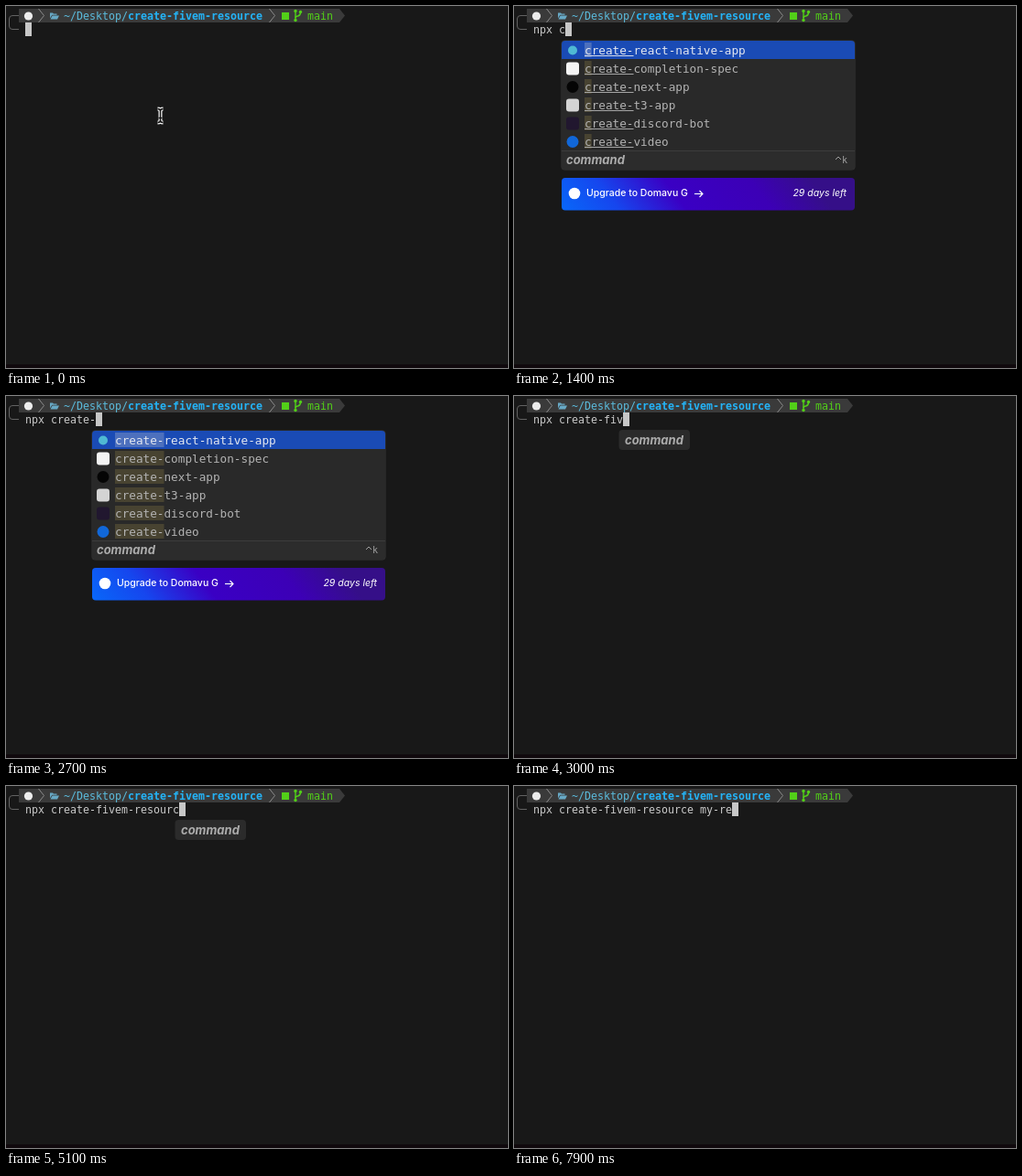
An HTML page with a canvas that plays this animation: 548x396 px, repeating every 8 s.

```html
<!DOCTYPE html>
<html lang="en">
<head>
<meta charset="utf-8">
<title>Terminal typing</title>
<style>
html, body { margin: 0; width: 100%; height: 100%; overflow: hidden; background: #181818; }
canvas { display: block; width: 548px; height: 396px; }
</style>
</head>
<body>
<canvas id="stage" width="548" height="396"></canvas>
<script>
const ctx = document.getElementById('stage').getContext('2d');
const LOOP = 8000;
const CELL = 7;
const LEFT = 21;
const MONO = '"DejaVu Sans Mono", monospace';
const SANS = 'Inter, sans-serif';
const COMMAND = 'npx create-fivem-resource my-re';

// Moment at which each character of COMMAND is typed
const KEYS = [
  600, 800, 1100, 1300,
  1400, 1500, 1600, 1700, 1800, 2000, 2200,
  2800, 2900, 3000, 3200, 3400, 3700,
  3900, 4100, 4300, 4400, 4600, 4900, 5100, 5700,
  6000, 6800, 7000, 7700, 7800, 7900
];

const ITEMS = [
  ['create-react-native-app', '#4fb9d3', 'circle'],
  ['create-completion-spec', '#f4f4f4', 'square'],
  ['create-next-app', '#050505', 'circle'],
  ['create-t3-app', '#d4d4d4', 'square'],
  ['create-discord-bot', '#21172f', 'square'],
  ['create-video', '#1167d8', 'circle']
];

function text(str, x, y, color, font, align = 'left') {
  ctx.font = font;
  ctx.fillStyle = color;
  ctx.textAlign = align;
  ctx.fillText(str, x, y);
}

function rect(x, y, w, h, color) {
  ctx.fillStyle = color;
  ctx.fillRect(x, y, w, h);
}

function box(x, y, w, h, r, color) {
  ctx.beginPath();
  ctx.roundRect(x, y, w, h, r);
  ctx.fillStyle = color;
  ctx.fill();
}

function dot(x, y, r, color) {
  ctx.beginPath();
  ctx.arc(x, y, r, 0, Math.PI * 2);
  ctx.fillStyle = color;
  ctx.fill();
}

function line(points, color, width = 1) {
  ctx.beginPath();
  points.forEach(([x, y], i) => i ? ctx.lineTo(x, y) : ctx.moveTo(x, y));
  ctx.strokeStyle = color;
  ctx.lineWidth = width;
  ctx.stroke();
}

function bracket() {
  ctx.beginPath();
  ctx.moveTo(14, 10.5);
  ctx.lineTo(7, 10.5);
  ctx.quadraticCurveTo(3.5, 10.5, 3.5, 14);
  ctx.lineTo(3.5, 22);
  ctx.quadraticCurveTo(3.5, 25.5, 7, 25.5);
  ctx.lineTo(14, 25.5);
  ctx.strokeStyle = '#626262';
  ctx.lineWidth = 1;
  ctx.stroke();
}

function folder(x, y) {
  ctx.fillStyle = '#67a9c6';
  ctx.beginPath();
  ctx.moveTo(x, y + 6);
  ctx.lineTo(x, y);
  ctx.lineTo(x + 3, y);
  ctx.lineTo(x + 4, y + 1);
  ctx.lineTo(x + 7.5, y + 1);
  ctx.lineTo(x + 7.5, y + 2.3);
  ctx.lineTo(x + 2.3, y + 2.3);
  ctx.fill();
  ctx.beginPath();
  ctx.moveTo(x + 2.6, y + 3);
  ctx.lineTo(x + 10, y + 3);
  ctx.lineTo(x + 8, y + 7);
  ctx.lineTo(x + 0.5, y + 7);
  ctx.fill();
}

function branch(x, y) {
  const green = '#52cf18';
  line([[x, y + 2], [x, y + 11]], green, 1.4);
  ctx.beginPath();
  ctx.moveTo(x + 5.5, y + 3);
  ctx.quadraticCurveTo(x + 5.5, y + 6.5, x + 2.5, y + 7);
  ctx.quadraticCurveTo(x, y + 7.3, x, y + 9);
  ctx.stroke();
  [[0, 1.5], [5.5, 2.5], [0, 11.5]].forEach(([dx, dy]) => dot(x + dx, y + dy, 1.7, green));
}

function header() {
  const font = '11.63px ' + MONO;
  ctx.beginPath();
  [[14, 3], [364, 3], [370, 10.5], [364, 18], [14, 18]].forEach(p => ctx.lineTo(...p));
  ctx.fillStyle = '#3a3a3a';
  ctx.fill();
  bracket();
  dot(24.5, 11, 4.6, '#ececec');
  for (const x of [35.5, 287.5]) line([[x, 3], [x + 6, 10.5], [x, 18]], '#8a8a8a');
  folder(48, 7.5);
  text('~/Desktop/', 63, 15, '#5bbbdc', font);
  text('create-fivem-resource', 133, 15, '#24b4f8', 'bold ' + font);
  rect(301, 7, 8, 8, '#52cf18');
  branch(316, 4);
  text('main', 329, 15, '#52cf18', font);
}

function pointer(x, y) {
  for (const [color, width] of [['#f2f2f2', 4], ['#111111', 1.4]]) {
    ctx.beginPath();
    ctx.moveTo(x - 3, y - 7.5);
    ctx.quadraticCurveTo(x, y - 7.5, x, y - 5);
    ctx.quadraticCurveTo(x, y - 7.5, x + 3, y - 7.5);
    ctx.moveTo(x, y - 5);
    ctx.lineTo(x, y + 5);
    ctx.moveTo(x - 3, y + 7.5);
    ctx.quadraticCurveTo(x, y + 7.5, x, y + 5);
    ctx.quadraticCurveTo(x, y + 7.5, x + 3, y + 7.5);
    ctx.moveTo(x - 2, y + 2.5);
    ctx.lineTo(x + 2, y + 2.5);
    ctx.strokeStyle = color;
    ctx.lineWidth = width;
    ctx.stroke();
  }
}

function label(x, y) {
  text('command', x, y, '#acacac', 'italic bold 13px ' + SANS);
}

function item([name, color, shape], i, x, matched) {
  const y = 38 + i * 20;
  const step = 7.65;
  const active = i === 0;
  if (active) box(x, y, 320, 20, [4, 4, 0, 0], '#1a4bb5');
  if (shape === 'circle') dot(x + 12, y + 10.5, active ? 5 : 6.5, color);
  else box(x + 5, y + 3.5, 14, 14, 3, color);
  rect(x + 25, y + 2, matched * step, 16, active ? '#4d70bd' : '#484331');
  text(name, x + 25, y + 15, active ? '#e4e8f1' : '#b3b3b3', '12.7px ' + MONO);
  if (matched < 7) rect(x + 25, y + 16, 7 * step, 1, active ? '#d4daea' : '#a5a5a5');
}

function banner(x) {
  const y = 188;
  const fill = ctx.createLinearGradient(x, y + 85, x + 215, y - 75);
  fill.addColorStop(0, '#007bff');
  fill.addColorStop(0.3, '#1646ee');
  fill.addColorStop(0.52, '#3a00c4');
  fill.addColorStop(0.8, '#3c00b6');
  fill.addColorStop(1, '#350f88');
  box(x, y, 320, 35.5, 4, fill);
  dot(x + 14, y + 17, 6.3, '#ffffff');
  text('Upgrade to Domavu G', x + 27, y + 20, '#ffffff', '500 10.5px ' + SANS);
  line([[x + 145, y + 17.5], [x + 154, y + 17.5]], '#ffffff', 1.1);
  line([[x + 150.5, y + 14], [x + 154, y + 17.5], [x + 150.5, y + 21]], '#ffffff', 1.1);
  text('29 days left', x + 311, y + 20, '#ffffff', 'italic 10.5px ' + SANS, 'right');
}

function menu(x, matched) {
  box(x - 0.5, 37.5, 321, 142, 4, '#363636');
  box(x, 38, 320, 141, 4, '#292929');
  ITEMS.forEach((entry, i) => item(entry, i, x, matched));
  box(x, 158, 320, 21, [0, 0, 4, 4], '#2c2c2c');
  rect(x, 158, 320, 1, '#3c3c3c');
  label(x + 5, 173);
  line([[x + 299, 168], [x + 302, 165], [x + 305, 168]], '#a0a0a0');
  text('k', x + 306, 172, '#a0a0a0', '10px ' + MONO);
  banner(x);
}

function hint(x) {
  box(x - 0.5, 37, 77.5, 22, 4, '#2b2b2b');
  label(x + 6, 53);
}

function draw(t) {
  const count = KEYS.filter(k => k <= t).length;
  const cursor = LEFT + count * CELL;
  rect(0, 0, 548, 396, '#181818');
  rect(0, 392, 548, 4, '#10090d');
  header();
  text(COMMAND.slice(0, count), LEFT, 30, '#cacaca', '11.63px ' + MONO);
  rect(cursor, 18, 7, 15, '#c7c7c7');
  if (count === 0) pointer(168.5, 120);
  if (count >= 4 && count <= 11) menu(cursor - 4, count - 4);
  else if (count >= 12 && count <= 25) hint(cursor - 4);
}

const start = performance.now();
function tick() {
  draw((performance.now() - start) % LOOP);
  requestAnimationFrame(tick);
}
tick();
</script>
</body>
</html>
```
